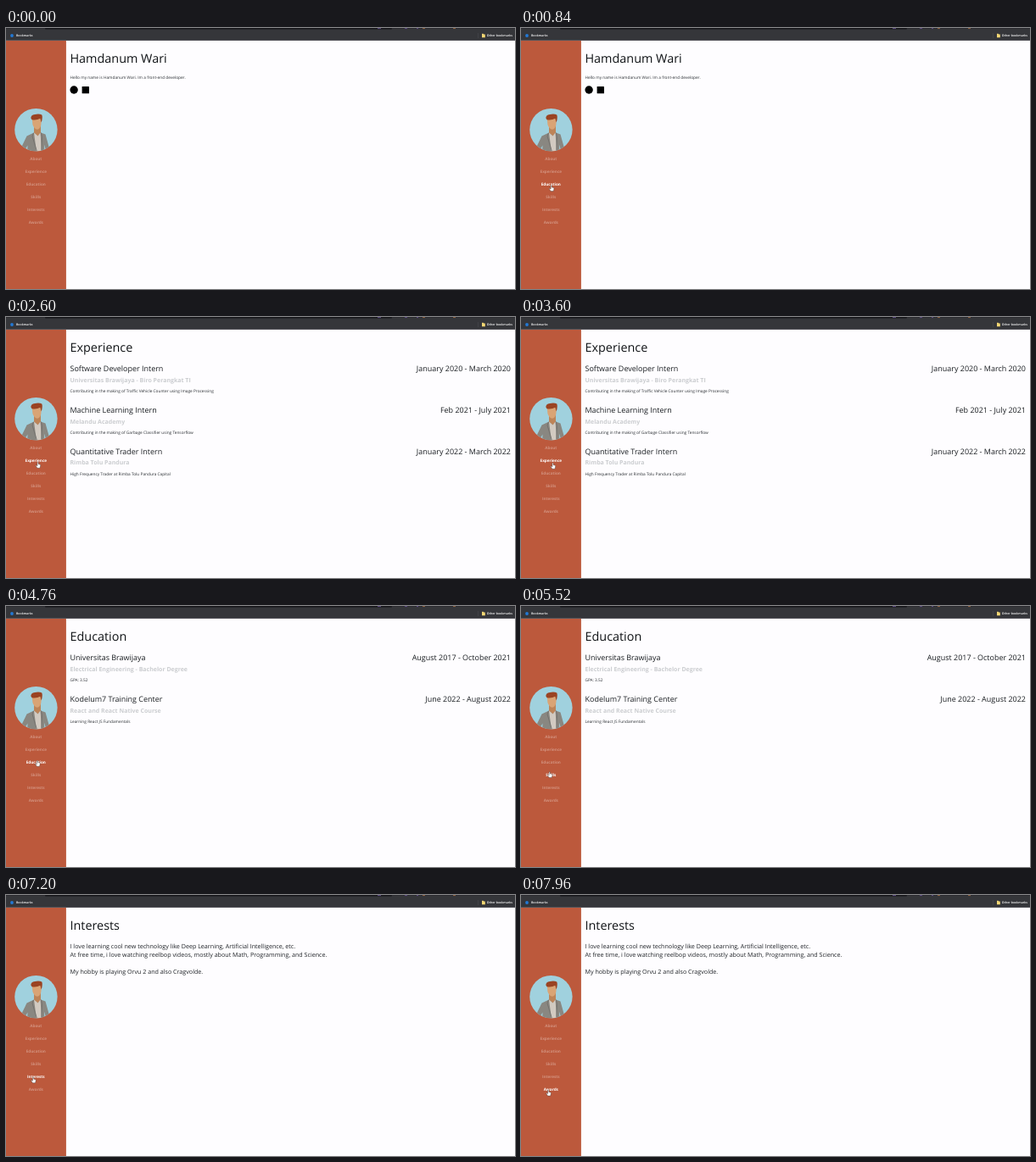
An HTML page for the animation above (8 s loop, 600 px wide and 308 px high).

```html
<!DOCTYPE html>
<html lang="en">
<head>
<meta charset="utf-8">
<title>Resume site</title>
<style>
  html, body { margin: 0; width: 100%; height: 100%; overflow: hidden; background: #fefdff; }
  svg { display: block; width: 100vw; height: 100vh; }
  text { font-family: "Open Sans", "Noto Sans", sans-serif; text-rendering: geometricPrecision; white-space: pre; }
  .title { font-size: 14.4px; fill: #111417; }
  .head { font-size: 8.97px; fill: #1b1f23; }
  .sub { font-size: 7px; font-weight: 700; fill: #cbcdd0; }
  .body { font-size: 4.77px; fill: #2b2f33; }
  .lead { font-size: 7.15px; fill: #1f2327; }
  .menu { font-size: 4.66px; font-weight: 700; fill: #fff; text-anchor: middle; }
  .bar { font-size: 3.55px; font-weight: 600; fill: #fff; }
  .end { text-anchor: end; }
</style>
</head>
<body>
<svg id="stage" viewBox="0 0 600 308" preserveAspectRatio="none">
  <rect width="600" height="308" fill="#fefdff"/>
  <rect y="14" width="70.9" height="294" fill="#bc593c"/>

  <rect width="600" height="15" fill="#57575c"/>
  <rect width="600" height="14" fill="#35363a"/>
  <rect width="600" height="1" fill="#2a2a30"/>
  <rect x="46" width="409" height="1.6" rx=".8" fill="#141418"/>
  <path d="M438 .5h4M470 .5h3M484 .5h2" stroke="#5b4a80"/>
  <path d="M491 .5h3M527 .5h3" stroke="#8a6040"/>
  <circle cx="7" cy="9" r="1.9" fill="#2279d6"/>
  <text class="bar" x="12" y="10.3">Bookmarks</text>
  <path d="M556.5 6v6" stroke="#55565b" stroke-width=".4"/>
  <path d="M561 6.8h1.7l.6.7h1.5v3.8H561z" fill="#f3d774"/>
  <text class="bar end" x="597" y="10.3">Other bookmarks</text>

  <clipPath id="disc"><circle cx="35.4" cy="120.1" r="25.2"/></clipPath>
  <g clip-path="url(#disc)">
    <rect x="10" y="94" width="52" height="52" fill="#a0d1de"/>
    <path d="M33 115h8v9l-3 4-5-4z" fill="#bd8458"/>
    <path d="M24.5 127.5l8.5-4 4.5 4 3.5-4 5.5 2 5 18-4 2-2.5-8 .5 10H25l.5-9-3 5-5-1.5z" fill="#898781"/>
    <path d="M33 123.5l4.5 4 3-4 1.5 23h-6z" fill="#d2cac1"/>
    <path d="M32.5 123.8l-1.5 4 5.5 18M41.2 123.5l1.3 5-.8 18" fill="none" stroke="#6f6d69" stroke-width=".8"/>
    <path d="M30.6 105l11.4.5-.7 9q-1.3 5-4.3 5.3-4-.6-5.6-5.8z" fill="#d9a475"/>
    <path d="M29.4 106.5q-.5-3.8 4.6-4.6 5.5-1 8.3.6 1.2 3-.6 9l-1.4-4.7q-4 2.5-9.8 1.5z" fill="#9a4322"/>
  </g>

  <g id="menu"></g>
  <g id="pages"></g>
  <g id="cursor" stroke="#222" stroke-width=".35" stroke-linejoin="round" fill="#fff">
    <path id="hand" d="M-.6.6Q0-.4.6.6V2.6l2 .5q.7.2.6 1L2.8 6.2l-.4 1h-3L-2.3 4.8q-.4-.8.2-.9l1.5.8z"/>
    <path id="arrow" d="M0 0v5.2l1.2-1.1.8 1.9.9-.4-.8-1.8h1.7z"/>
  </g>
</svg>
<script>
const LOOP = 8000, LEFT = 75.5, RIGHT = 595;
const $ = id => document.getElementById(id);
const escape = s => s.replace(/&/g, "&amp;");
const text = (cls, x, y, s) => `<text class="${cls}" x="${x}" y="${y}">${escape(s)}</text>`;
const title = s => text("title", LEFT, 41, s);

const entry = ([name, date, place, note], i) => {
  const y = 64.3 + 48.8 * i;
  return text("head", LEFT, y, name) + text("head end", RIGHT, y, date) +
    text("sub", LEFT, y + 12.4, place) + text("body", LEFT, y + 25, note);
};

const skill = (name, x, y) =>
  `<circle cx="${x + 2.5}" cy="${y}" r="2.6" fill="#2fd07a"/>` +
  `<path d="M${x + 1.2} ${y}l1 1 1.7-1.9" fill="none" stroke="#fff" stroke-width=".6"/>` +
  text("body", x + 6.4, y + 1.8, name);

const pages = [
  { from: 0, html: title("Hamdanum Wari") +
    text("body", LEFT, 60.3, "Hello my name is Hamdanum Wari. Im a front-end developer.") +
    '<circle cx="80.1" cy="73" r="4.7"/><rect x="89.6" y="68.9" width="8.4" height="8.4" rx=".6"/>' },
  { from: 2600, html: title("Experience") + [
    ["Software Developer Intern", "January 2020 - March 2020", "Universitas Brawijaya - Biro Perangkat TI",
      "Contributing in the making of Traffic Vehicle Counter using Image Processing"],
    ["Machine Learning Intern", "Feb 2021 - July 2021", "Melandu Academy",
      "Contributing in the making of Garbage Classifier using Tensorflow"],
    ["Quantitative Trader Intern", "January 2022 - March 2022", "Rimba Tolu Pandura",
      "High Frequency Trader at Rimba Tolu Pandura Capital"]
  ].map(entry).join("") },
  { from: 4400, html: title("Education") + [
    ["Universitas Brawijaya", "August 2017 - October 2021", "Electrical Engineering - Bachelor Degree", "GPA: 3.52"],
    ["Kodelum7 Training Center", "June 2022 - August 2022", "React and React Native Course",
      "Learning React JS Fundamentals"]
  ].map(entry).join("") },
  { from: 5720, html: title("Skills") + text("head", LEFT, 64.3, "Programming Language & Tools") +
    ["Python", "C/C++", "Golang", "JavaScript"].map((s, i) => skill(s, LEFT, 85 + 10 * i)).join("") +
    ["React", "Linux", "Tensorflow"].map((s, i) => skill(s, 201.2, 85 + 10 * i)).join("") },
  { from: 6960, html: title("Interests") +
    text("lead", LEFT, 63, "I love learning cool new technology like Deep Learning, Artificial Intelligence, etc.") +
    text("lead", LEFT, 73, "At free time, i love watching reelbop videos, mostly about Math, Programming, and Science.") +
    text("lead", LEFT, 93, "My hobby is playing Orvu 2 and also Cragvolde.") }
];

// Pointer stops: time, x, y of the tip
const stops = [
  [0, 110, -12], [40, 110, -12], [420, 60, 100], [760, 36, 178], [1000, 35, 206],
  [1480, 34.8, 155], [2160, 34.8, 155], [2560, 37.5, 171], [3520, 37.5, 171],
  [3960, 37, 182], [5240, 37, 182], [5460, 33.7, 195.3], [6100, 33.7, 195.3],
  [6440, 32, 212.3], [7120, 32, 212.3], [7480, 32.2, 229.8], [LOOP, 32.2, 229.8]
];

const rowY = i => 154 + 15 * i;
$("menu").innerHTML = ["About", "Experience", "Education", "Skills", "Interests", "Awards"]
  .map((s, i) => text("menu", 35.3, rowY(i) + 1.7, s)).join("");
$("pages").innerHTML = pages.map(p => `<g>${p.html}</g>`).join("");
const links = [...$("menu").children], views = [...$("pages").children];

function pointerAt(t) {
  const i = Math.max(1, stops.findIndex(s => s[0] > t));
  const [t0, x0, y0] = stops[i - 1], [t1, x1, y1] = stops[i];
  const u = (t - t0) / (t1 - t0), k = u * u * (3 - 2 * u);
  return [x0 + (x1 - x0) * k, y0 + (y1 - y0) * k];
}

function render(t) {
  const [x, y] = pointerAt(t);
  const hovered = Math.abs(x - 35) < 18 ? Math.round((y - rowY(0)) / 15) : -1;
  const onLink = hovered >= 0 && hovered < links.length;
  links.forEach((link, i) => link.setAttribute("fill-opacity", i === hovered ? 1 : 0.34));
  const current = pages.filter(p => p.from <= t).length - 1;
  views.forEach((view, i) => view.setAttribute("display", i === current ? "inline" : "none"));
  $("cursor").setAttribute("transform", `translate(${x.toFixed(2)} ${y.toFixed(2)})`);
  $("hand").setAttribute("display", onLink ? "inline" : "none");
  $("arrow").setAttribute("display", onLink ? "none" : "inline");
}

const start = performance.now();
function tick() {
  render((performance.now() - start) % LOOP);
  requestAnimationFrame(tick);
}
tick();
</script>
</body>
</html>
```
